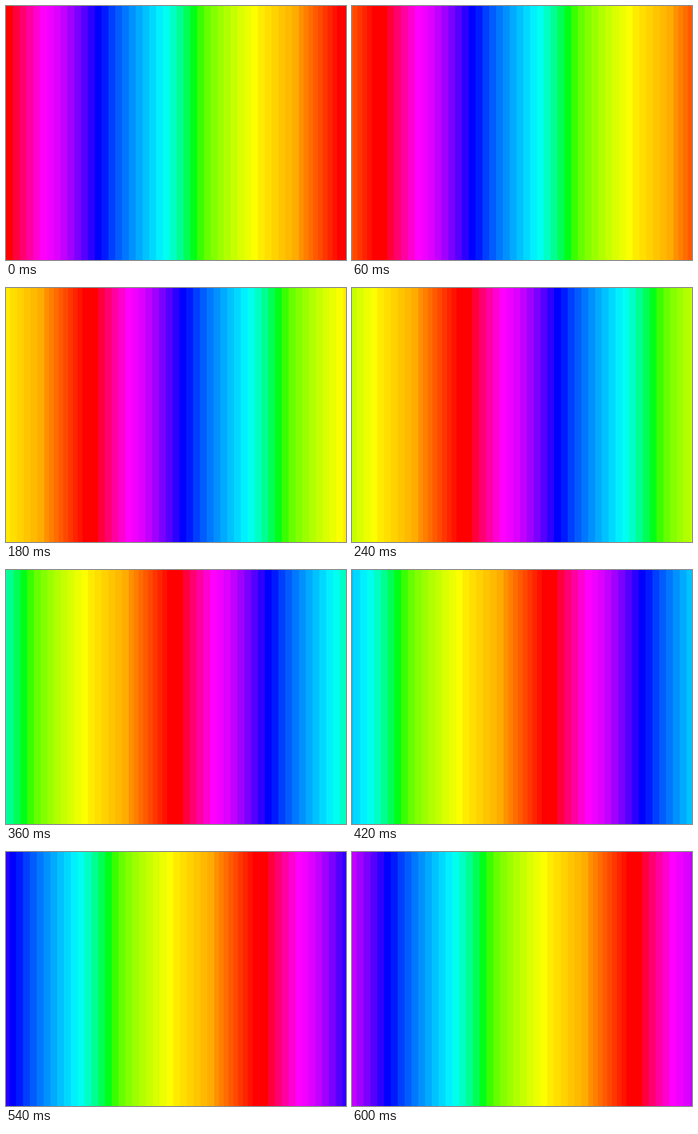
Write an HTML page with a canvas that moves like this. It is 498 by 373 pixels and loops after 0.66 s.

```html
<!DOCTYPE html>
<html lang="en">
<head>
<meta charset="utf-8">
<title>Rainbow bands</title>
<style>
html, body { margin: 0; width: 100%; height: 100%; overflow: hidden; background: #f00; }
canvas { display: block; }
</style>
</head>
<body>
<canvas id="stage" width="498" height="373"></canvas>
<script>
const W = 498, H = 373, STEP = 60, STEPS = 11, SHIFT = W / 12;
const ctx = document.getElementById('stage').getContext('2d');

// A run of bands in which one colour channel eases between two values.
function ramp(count, from, to, power, mix) {
  return Array.from({ length: count }, (_, i) => {
    const t = (i / (count - 1)) ** power;
    return `rgb(${mix(Math.round(from + (to - from) * t))})`;
  });
}

const colors = [
  ...ramp(5, 60, 255, 0.95, v => [255, 0, v]),
  ...ramp(8, 240, 0, 1.3, v => [v, 0, 255]),
  ...ramp(9, 26, 240, 0.85, v => [0, v, 255]),
  ...ramp(5, 238, 24, 1.2, v => [0, 255, v]),
  ...ramp(9, 58, 252, 0.7, v => [v, 255, 0]),
  ...ramp(6, 235, 172, 1, v => [255, v, 0]),
  ...ramp(9, 144, 0, 1, v => [255, v, 0])
];

// Wide bands first, then narrow ones from orange on; red fills the rest.
const WIDE = 42, START = 10.6;
function edge(i) {
  if (i === colors.length) return START + W;
  return START + Math.min(i, WIDE) * 9.98 + Math.max(0, i - WIDE) * 7;
}

function draw(time) {
  const offset = Math.floor(time / STEP) % STEPS * SHIFT;
  colors.forEach((color, i) => {
    ctx.fillStyle = color;
    for (const turn of [-W, 0]) {
      const left = Math.floor(edge(i) + offset + turn);
      const right = Math.floor(edge(i + 1) + offset + turn);
      ctx.fillRect(left, 0, right - left, H);
    }
  });
}

let start;
function tick(now) {
  start ??= now;
  draw(now - start);
  requestAnimationFrame(tick);
}
draw(0);
requestAnimationFrame(tick);
</script>
</body>
</html>
```
